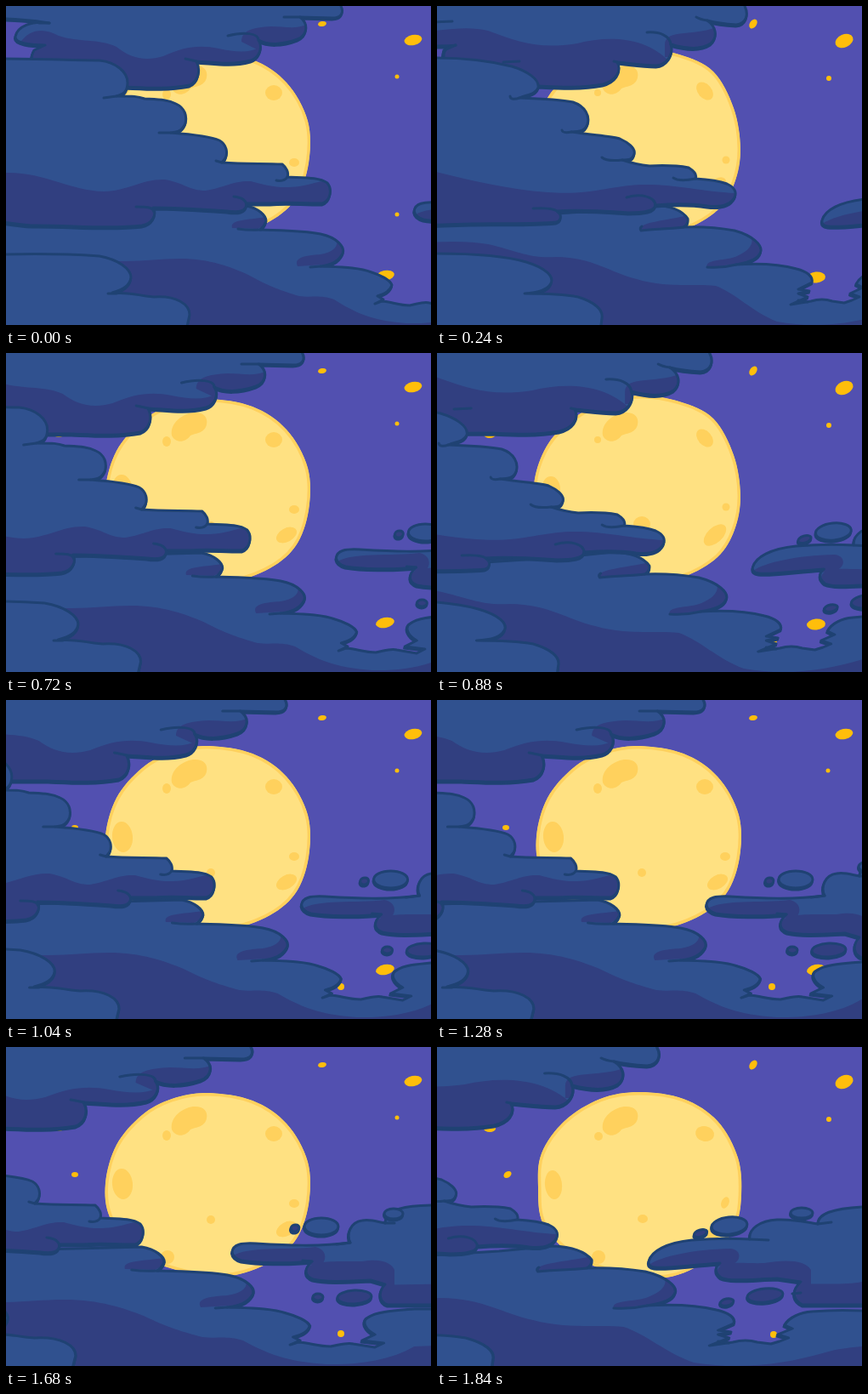
Animation, 500 px wide and 375 px high, one loop 1920 ms. Source, as an HTML page with a canvas:

```html
<!DOCTYPE html>
<html lang="en">
<head>
<meta charset="utf-8">
<title>Moon behind drifting clouds</title>
<style>
html, body { margin: 0; width: 100%; height: 100%; overflow: hidden; background: #5250b0; }
canvas { display: block; width: 500px; height: 375px; }
</style>
</head>
<body>
<canvas id="stage" width="500" height="375"></canvas>
<script>
const ctx = document.getElementById('stage').getContext('2d');
const STEP = 80, STEPS = 24;
const SKY = '#5250b0', LIGHT = '#30518f', SHADE = '#313f80', INK = '#1f4273';
const MOON = '#ffe182', RIM = '#ffd15d', STAR = '#ffbe0b';

const path = d => new Path2D(d);

// Closed smooth curve through a flat list of points
function loop(p) {
  const n = p.length / 2, out = new Path2D();
  const at = i => { const k = (i + n) % n; return [p[2 * k], p[2 * k + 1]]; };
  out.moveTo(p[0], p[1]);
  for (let i = 0; i < n; i++) {
    const [a, b, c, d] = [at(i - 1), at(i), at(i + 1), at(i + 2)];
    out.bezierCurveTo(
      b[0] + (c[0] - a[0]) / 6, b[1] + (c[1] - a[1]) / 6,
      c[0] - (d[0] - b[0]) / 6, c[1] - (d[1] - b[1]) / 6, c[0], c[1]);
  }
  return out;
}

function oval([x, y, rx, ry, turn = 0], color) {
  ctx.beginPath();
  ctx.ellipse(x, y, rx, ry, turn, 0, 7);
  ctx.fillStyle = color;
  ctx.fill();
}

// Each cloud has two drawings; `at` is the step its coordinates refer to.
const cloud = (at, edge, shade, line, front, puffs = []) =>
  ({ at, edge: path(edge), shade: path(shade), line: path(line), front: front && path(front), puffs });

const top_ = [
  cloud(0,
    'M-60 -20 L393 -20 L394 0 C398 8 394 14 384 14 L346 13 C356 21 355 34 343 39 C325 46 308 46 297 40 C303 50 297 61 288 64 C265 70 245 66 224 65 C229 75 227 88 216 93 C190 98 165 96 140 95 L40 95 C28 80 28 60 33 52 L46 46 C30 46 10 44 11 36 C13 24 30 17 51 20 C35 17 20 15 -60 13 Z',
    'M16 44 C28 26 45 26 62 35 C85 43 110 38 130 48 C145 60 162 66 185 59 C208 48 228 45 250 50 C270 54 285 56 300 48 L296 110 L16 110 Z M277 42 C277 29 290 25 312 24 C328 24 342 28 355 21 L350 52 L297 52 Z',
    'M346 13 L327 13 M297 40 C297 32 280 30 261 35 M224 65 Q216 63 211 62 M51 20 L39 20'),
  cloud(3,
    'M-60 -20 L362 -20 L362 0 C367 10 364 21 352 22 C335 21 325 19 318 17 C328 24 331 36 322 44 C310 52 292 50 275 45 C279 57 270 69 258 70 C240 70 225 67 212 66 C218 77 210 88 195 92 C170 97 140 95 120 94 L20 95 Q2 78 8 52 L22 46 Q8 48 -60 46 Z',
    'M-60 36 C0 30 30 22 60 29 C98 43 120 51 165 44 C200 35 245 35 274 66 L270 110 L-60 110 Z M268 46 C268 26 302 36 328 25 L330 60 L268 60 Z',
    'M318 17 Q310 16 305 13 M275 45 C274 35 262 30 247 31 M212 66 L208 65 M78 66 L97 65 M-5 19 L18 18 M8 60 Q7 48 22 46')
];

const main = [
  cloud(0,
    'M-60 62 L0 62 C40 62 80 64 110 64 C130 66 143 78 143 90 C143 101 138 104 130 106 C150 106 155 106 163 109 C180 110 190 110 200 115 C211 120 213 130 211 138 C207 147 202 148 194 149 C220 151 240 153 251 158 C260 163 261 173 258 179 L254 184 C280 186 300 185 325 186 C330 190 333 196 331 201 C350 202 368 201 378 208 C384 215 382 229 372 232 C345 232 330 230 311 232 L283 232 C283 242 273 243 260 241 C230 239 200 237 173 237 C178 245 172 256 160 258 C120 263 70 257 30 258 Q10 257 -60 245 Z',
    'M-60 196 L0 196 C45 195 75 217 115 218 C145 217 160 203 187 204 C210 208 215 217 235 217 C258 213 268 205 288 206 C308 211 320 215 345 212 C365 209 370 204 382 207 L390 270 L-60 275 Z',
    'M130 106 L115 108 M194 149 L180 149 M254 184 L247 182 M331 201 Q327 207 318 205 M283 235 C283 228 277 225 268 224 M174 242 C173 236 164 236 153 236'),
  cloud(3,
    'M-60 60 L0 61 C35 61 68 66 88 71 C105 76 121 86 119 96 C116 104 106 104 97 108 C125 109 145 110 160 113 C175 118 180 130 177 139 C174 147 168 148 158 148 C185 152 205 153 215 156 C224 160 234 167 232 174 C230 181 225 181 218 181 C230 185 240 187 250 188 C270 187 285 188 296 190 C304 195 306 199 304 203 C320 204 333 206 341 209 C350 213 353 219 350 225 C345 234 335 237 318 235 C300 232 280 232 257 234 C256 241 245 243 225 243 C195 241 170 239 141 241 C147 245 147 252 140 254 C110 257 70 255 40 256 L-60 259 Z',
    'M-60 182 C0 193 60 214 130 219 C180 223 205 211 240 210 C280 209 310 218 352 220 L360 270 L-60 275 Z',
    'M97 108 C92 110 86 110 86 106 M158 148 Q148 150 147 146 M218 181 Q200 183 194 178 M304 203 Q285 207 278 202 M257 236 C258 224 240 220 223 225 M143 243 C140 238 128 237 113 238')
];

const bottom = [
  cloud(0,
    'M-60 245 L250 236 L283 235 C297 238 306 246 306 253 Q304 259 299 263 C325 264 350 264 370 268 C390 272 399 284 396 291 C391 301 382 304 370 306 C395 307 415 307 430 313 C440 316 452 322 454 328 C452 335 446 338 437 341 L444 345 L434 350 L442 347 C455 348 462 352 475 352 C485 350 492 347 498 349 L520 353 L529 348 L507 345 L520 338 C510 332 506 322 513 318 C522 311 540 310 560 308 L800 308 V420 H-60 Z',
    'M0 300 H140 C165 300 180 297 205 297 C240 297 265 307 285 316 C310 330 325 335 345 341 C360 343 370 339 386 345 C410 360 430 370 471 373 C500 374 535 369 560 352 L800 340 V420 H0 Z M266 261 C263 251 282 252 305 248 L306 257 L296 262 Z M343 306 C337 294 358 293 370 292 C385 290 391 282 389 276 L398 286 L389 303 Z',
    'M299 263 Q285 264 273 262 M370 306 L358 307 M304 258 L300 263',
    'M-60 290 L0 292 C40 291 80 292 110 294 C132 298 147 309 147 319 C146 329 137 334 125 337 C160 338 150 340 174 342 C201 340 216 351 216 363 L208 400 H-60 Z M120 338 h10'),
  cloud(3,
    'M-60 258 L200 240 L255 234 C275 235 289 241 295 250 Q296 257 290 260 C315 259 333 261 350 264 C372 270 382 281 381 288 C379 297 368 301 352 304 C385 302 405 304 423 309 C435 312 443 318 441 325 L425 333 L438 335 L425 338 L436 342 L427 346 L416 351 L440 347 C450 344 459 345 465 347 L479 349 L488 346 L497 342 L486 338 L501 331 L493 327 C498 317 510 312 521 311 C540 309 555 309 573 310 L800 308 V420 H-60 Z',
    'M-60 283 C0 276 30 275 60 280 C95 288 108 297 140 295 C185 296 203 313 235 321 C270 332 305 326 328 329 C352 338 370 359 400 371 C450 380 495 372 532 360 C560 350 590 350 800 340 V420 H-60 Z M240 264 C235 254 267 253 295 246 L296 258 L288 262 Z M318 308 C313 297 340 300 353 294 C367 288 374 279 369 270 L382 284 L377 299 Z',
    'M290 260 C275 262 255 262 240 264 M352 304 C340 307 330 308 318 307 M240 264 Q238 261 241 259 M425 346 L436 348',
    'M-60 292 L0 291 C35 291 75 292 105 301 C128 308 138 318 134 326 C130 334 120 337 103 338 C130 338 150 339 166 342 C185 348 196 357 194 367 L190 400 H-60 Z')
];

const right = [
  cloud(16,
    'M317 241 C318 232 328 230 345 231 C380 233 420 235 456 230 C451 220 456 206 470 204 C480 202 490 206 497 207 C498 190 520 186 560 186 L800 186 V303 H500 C490 300 488 288 497 279 L480 274 C455 275 430 277 412 273 C402 269 401 261 411 252 C385 255 345 254 328 251 Q318 248 317 241 Z',
    'M317 246 C335 234 380 239 415 235 C428 238 428 248 424 254 L320 270 Z M402 262 C412 250 440 252 470 252 C495 248 505 255 508 262 L508 285 H402 Z M480 280 L800 274 V310 H480 Z',
    'M456 230 L440 232 M497 207 L508 207 M411 252 L400 251', null,
    [[391, 213, 5, 4, -.3], [422, 211, 20, 10, 0, 1], [418, 294, 6, 4], [461, 294, 20, 8, -.05], [507, 196, 11, 6, 0, 1]]),
  cloud(23,
    'M249 252 C252 240 270 230 300 227 C325 225 350 225 368 226 C366 214 380 204 400 203 C420 202 435 206 448 208 C448 196 465 190 500 188 L800 186 V303 H430 C420 298 415 288 428 276 L400 272 C370 273 345 276 334 271 C326 265 327 258 333 254 C300 256 270 261 256 259 Q248 258 249 252 Z',
    'M249 256 C265 246 300 238 345 237 C358 238 358 250 350 254 L250 275 Z M330 262 C335 250 360 255 385 254 C410 250 432 250 440 262 L440 280 L330 285 Z M410 278 C450 278 480 280 500 276 L800 270 V310 H410 Z',
    'M368 226 L390 227 M448 208 L464 206 M418 290 L428 289', null,
    [[310, 219, 8, 4, -.3], [344, 210, 21, 10, -.1, 1], [429, 195, 13, 6, 0, 1], [341, 300, 8, 4, -.2], [386, 292, 21, 8, -.1]])
];

const bean = path('M195 97 C193 82 207 72 220 70 C232 69 238 75 236 84 C234 94 224 94 217 97 C211 106 199 106 195 97 Z');
const moons = [
  { disc: loop([237, 54, 290, 63, 330, 90, 355, 135, 356, 185, 340, 228, 305, 256, 255, 270, 200, 262, 150, 240, 122, 200, 117, 160, 130, 115, 160, 80, 195, 61]),
    marks: [[189, 104, 5, 6], [315, 102, 10, 9], [339, 184, 6, 5], [330, 214, 13, 8, -.5], [137, 161, 12, 18, -.1], [241, 203, 5, 5], [190, 247, 8, 8]] },
  { disc: loop([238, 50, 285, 57, 325, 77, 349, 120, 357, 168, 350, 208, 330, 240, 290, 263, 240, 270, 190, 262, 145, 240, 118, 195, 114, 155, 126, 115, 150, 85, 190, 60]),
    marks: [[189, 102, 4, 4], [315, 100, 8, 12, -.7], [340, 181, 4.5, 4.5], [327, 214, 16, 9, -.75], [134, 160, 11, 15], [241, 201, 10, 9], [190, 247, 8, 8]] },
  { disc: loop([238, 53, 290, 61, 330, 87, 354, 130, 358, 175, 350, 212, 320, 249, 270, 271, 210, 265, 160, 245, 125, 208, 119, 165, 123, 125, 150, 87, 192, 61]),
    marks: [[190, 105, 5, 5], [315, 102, 11, 9, .2], [339, 183, 4.5, 7, .4], [329, 215, 14, 8, -.75], [137, 162, 10, 17, -.1], [242, 202, 6, 5], [190, 247, 8, 8]] }
];
const moonOrder = [0, 1, 0, 2];

const stars = [
  [[372, 21, 5, 3, -.2], [479, 40, 10.5, 6, -.2], [460, 83, 2.5, 2.5], [446, 317, 11, 6, -.2], [460, 245, 2.5, 2.5], [62, 96, 6, 3], [81, 150, 4, 3], [394, 337, 4, 4]],
  [[372, 21, 4, 6, .6], [479, 41, 11, 7.5, -.4], [461, 85, 3, 3], [446, 319, 11, 6.5, -.1], [461, 245, 4, 3], [62, 96, 7, 4], [83, 150, 5, 3.5, -.6], [396, 338, 4, 4]]
];

function ink(shape, fill) {
  ctx.strokeStyle = INK;
  ctx.lineWidth = 3;
  ctx.fillStyle = fill;
  if (fill) ctx.fill(shape);
  ctx.stroke(shape);
}

function drop(shape) {
  ctx.save();
  ctx.translate(-.5, 2);
  ink(shape, INK);
  ctx.restore();
}

function drawCloud(c, scale, dx) {
  ctx.save();
  ctx.transform(scale, 0, 0, 1, dx, 0);
  drop(c.edge);
  ctx.fillStyle = LIGHT;
  ctx.fill(c.edge);
  ctx.save();
  ctx.clip(c.edge);
  ctx.fillStyle = SHADE;
  ctx.fill(c.shade);
  ctx.restore();
  ink(c.edge);
  ink(c.line);
  if (c.front) { drop(c.front); ink(c.front, LIGHT); }
  for (const [x, y, rx, ry, turn, lit] of c.puffs) {
    const p = new Path2D();
    p.ellipse(x, y, rx, ry, turn || 0, 0, 7);
    drop(p);
    ink(p, lit ? LIGHT : SHADE);
  }
  ctx.restore();
}

const drift = (c, step, speed) => drawCloud(c, 1, (c.at - step) * speed);

// These layers widen a little while they move
function spread(c, step) {
  const k = (1 + .0075 * step) / (1 + .0075 * c.at);
  drawCloud(c, k, 8 * c.at * k - 8 * step);
}

function drawMoon({ disc, marks }) {
  ctx.save();
  ctx.clip(disc);
  ctx.fillStyle = MOON;
  ctx.fill(disc);
  ctx.fillStyle = RIM;
  ctx.fill(bean);
  marks.forEach(m => oval(m, RIM));
  ctx.strokeStyle = RIM;
  ctx.lineWidth = 7;
  ctx.stroke(disc);
  ctx.restore();
}

function draw(step) {
  const pose = step >> 1, v = pose % 2;
  ctx.lineJoin = ctx.lineCap = 'round';
  ctx.fillStyle = SKY;
  ctx.fillRect(0, 0, 500, 375);
  stars[v].forEach(s => oval(s, STAR));
  drawMoon(moons[moonOrder[pose % 4]]);
  drift(right[v], step, 10.2);
  spread(top_[v], step);
  spread(bottom[v], step);
  drift(main[v], step, 10.48);
}

const start = performance.now();
function tick() {
  draw(Math.floor((performance.now() - start) / STEP) % STEPS);
  requestAnimationFrame(tick);
}
tick();
</script>
</body>
</html>
```
